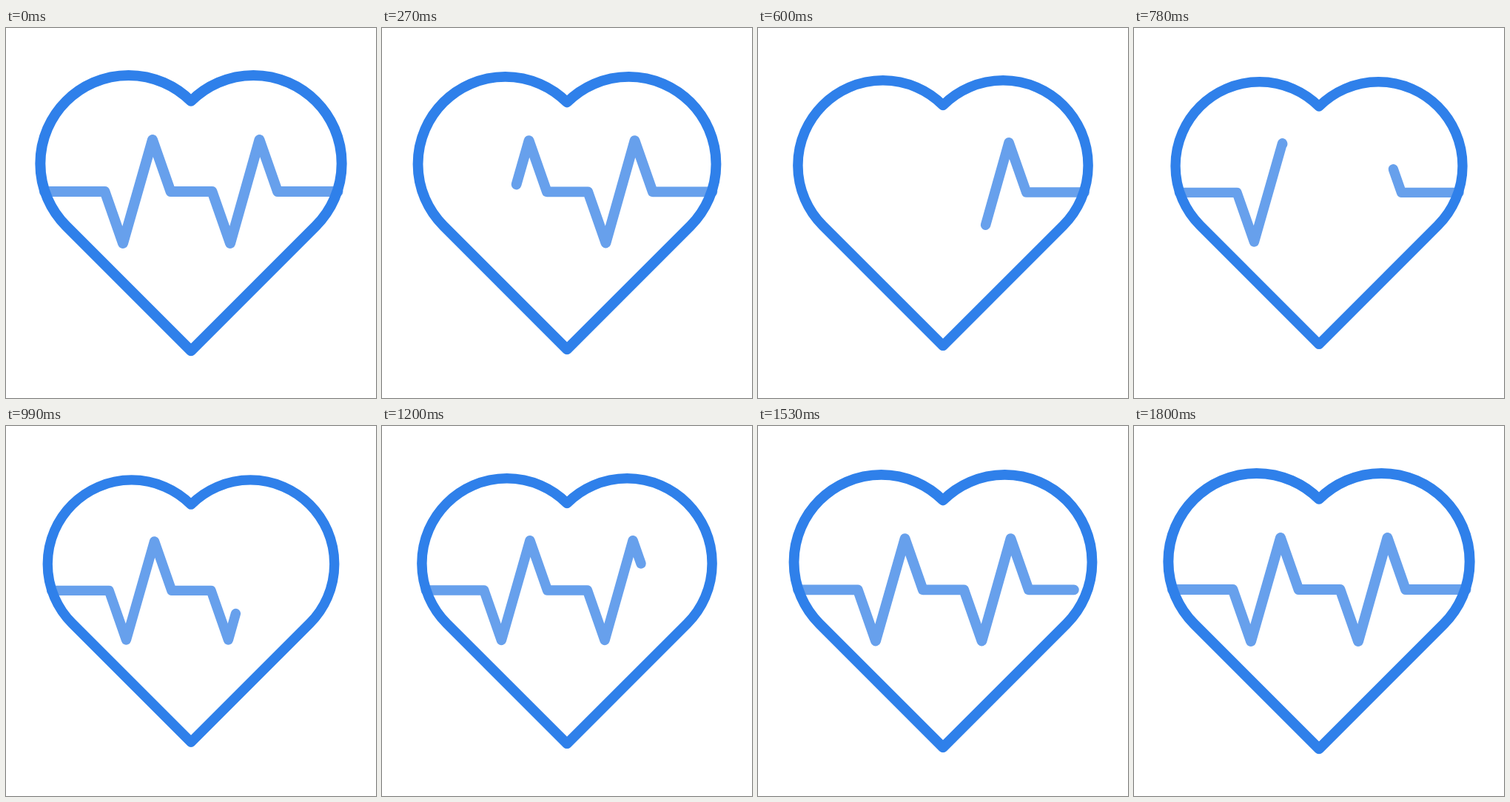
Write an HTML page with a canvas that moves like this. It is 500x500 px and loops after 1830 ms.

```html
<!DOCTYPE html>
<html lang="en">
<head>
<meta charset="utf-8">
<title>Heartbeat</title>
<style>
  html, body { margin: 0; width: 100%; height: 100%; overflow: hidden; background: #fff; }
  canvas { display: block; width: 100vmin; height: 100vmin; }
</style>
</head>
<body>
<canvas id="stage" width="500" height="500"></canvas>
<script>
const ctx = document.getElementById('stage').getContext('2d');
const LOOP = 1830, STEP = 30, CYCLE = 1800;
const HEART = '#2f80ea', PULSE = '#67a0ec';

const pulse = [
  [52, 221], [133.5, 221], [158, 291], [198, 151], [222.5, 221],
  [278.5, 221], [303, 291], [342.5, 151], [367, 221], [448.5, 221]
];
const lengths = pulse.slice(1).map((p, i) => Math.hypot(p[0] - pulse[i][0], p[1] - pulse[i][1]));
const total = lengths.reduce((a, b) => a + b, 0);

const clamp = v => Math.max(0, Math.min(1, v));
const smooth = v => v * v * (3 - 2 * v);

function bezierEase(x1, y1, x2, y2) {
  const at = (a, b, s) => 3 * a * (1 - s) ** 2 * s + 3 * b * (1 - s) * s * s + s ** 3;
  return x => {
    if (x <= 0 || x >= 1) return clamp(x);
    let lo = 0, hi = 1;
    for (let i = 0; i < 30; i++) {
      const mid = (lo + hi) / 2;
      if (at(x1, x2, mid) < x) lo = mid; else hi = mid;
    }
    return at(y1, y2, lo);
  };
}
const growEase = bezierEase(0.2, 0.55, 0.4, 1);

// Strokes the part of the pulse between two fractions of its length.
function drawPulse(from, to) {
  if (to - from < 0.0005) return;
  const a = from * total, b = to * total;
  let pos = 0, started = false;
  ctx.beginPath();
  lengths.forEach((len, i) => {
    const lo = Math.max(a, pos), hi = Math.min(b, pos + len);
    if (hi > lo) {
      const point = d => {
        const k = (d - pos) / len, p = pulse[i], q = pulse[i + 1];
        return [p[0] + (q[0] - p[0]) * k, p[1] + (q[1] - p[1]) * k];
      };
      if (!started) ctx.moveTo(...point(lo));
      started = true;
      ctx.lineTo(...point(hi));
    }
    pos += len;
  });
  ctx.strokeStyle = PULSE;
  ctx.stroke();
}

function drawHeart() {
  const r = 119.3, d = r * Math.SQRT1_2, cy = 183.2, q = Math.PI / 4;
  ctx.beginPath();
  ctx.moveTo(250, cy + 3 * d);
  ctx.arc(250 - d, cy, r, 3 * q, 7 * q);
  ctx.arc(250 + d, cy, r, 5 * q, 9 * q);
  ctx.closePath();
  ctx.strokeStyle = HEART;
  ctx.stroke();
}

function render(t) {
  const beat = smooth(1 - Math.abs(t / (CYCLE / 2) - 1));
  const scale = 1 - 0.05 * beat;
  ctx.setTransform(1, 0, 0, 1, 0, 0);
  ctx.fillStyle = '#fff';
  ctx.fillRect(0, 0, 500, 500);
  ctx.translate(250, 250);
  ctx.scale(scale, scale);
  ctx.translate(-250, -250);
  ctx.lineWidth = 14;
  ctx.lineCap = ctx.lineJoin = 'round';

  drawPulse(clamp(t / 912), 1);
  drawPulse(0, growEase((t - 600) / (CYCLE - 600)));
  drawHeart();
}

const start = performance.now();
function tick() {
  const t = (performance.now() - start) % LOOP;
  render(Math.floor(t / STEP) * STEP);
  requestAnimationFrame(tick);
}
tick();
</script>
</body>
</html>
```
